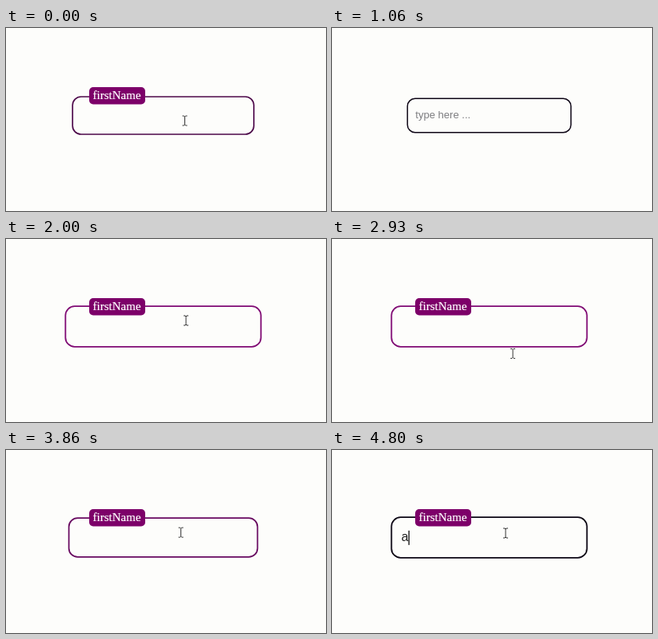
An HTML page that plays this animation: 400 px wide and 229 px high, repeating every 5 s.

```html
<!DOCTYPE html>
<html lang="en">
<head>
<meta charset="utf-8">
<title>Input label</title>
<style>
  html, body { margin: 0; width: 100%; height: 100%; overflow: hidden; background: #fdfdfb; }
  svg { display: block; width: 100%; height: 100%; }
  .sans { font: 13px "Liberation Sans", Arial, sans-serif; }
  .serif { font: 15px "Liberation Serif", "Times New Roman", serif; }
</style>
</head>
<body>
<svg viewBox="0 0 400 229">
  <g id="field">
    <rect id="border" x="94.7" y="88.4" width="203.6" height="42.2" rx="9.5" fill="none" stroke-width="1.5"/>
    <text id="placeholder" class="sans" x="104.7" y="113" fill="#7d7d80">type here ...</text>
    <text id="typed" class="sans" x="105" y="113.3" fill="#222">a</text>
    <rect id="caret" y="102.3" width="1.2" height="15" fill="#222"/>
  </g>
  <g id="label">
    <rect x="104" y="74" width="70" height="21.5" rx="5" fill="#7d0069"/>
    <text class="serif" x="108.6" y="89.3" fill="#fff" stroke="#fff" stroke-width=".2">firstName</text>
  </g>
  <path id="pointer" d="M-3-6h2l1 1 1-1h2M-3 6h2l1-1 1 1h2M0-5V5" fill="none" stroke="#333"/>
</svg>
<script>
const LOOP = 5000, STEP = 1000 / 15, TRANSITION = 300, TYPED_AT = 4400;
const PURPLE = [128, 10, 116], BLACK = [12, 6, 20];
const focusSpans = [[-98, 820], [1670, 3150], [3720, LOOP + TRANSITION]];
const caretSpans = [[60, 400], [2050, 2930], [4000, LOOP]];
// Each path lists [time, x, y]; the pointer is hidden between paths.
const pointerPaths = [
  [[0, 223.5, 116], [400, 223.5, 117.5], [530, 224, 137], [599, 224, 137]],
  [[1520, 228, 225], [1740, 225, 102], [2000, 225, 102], [2260, 226, 141], [2930, 226, 141], [3059, 228, 232]],
  [[3730, 220, 110], [3930, 218, 100], [4260, 218, 100], [4460, 217, 104], [5000, 217, 104]]
];

const el = id => document.getElementById(id);
const clamp = v => Math.max(0, Math.min(1, v));
const mix = (a, b, p) => a + (b - a) * p;
const within = (spans, t) => spans.some(([from, to]) => t >= from && t < to);
const show = (id, on) => el(id).setAttribute("visibility", on ? "visible" : "hidden");

// The CSS "ease" curve: cubic-bezier(.25, .1, .25, 1)
function ease(x) {
  if (x <= 0 || x >= 1) return clamp(x);
  const bezier = (a, b, u) => 3 * a * u * (1 - u) ** 2 + 3 * b * u * u * (1 - u) + u ** 3;
  let low = 0, high = 1;
  for (let i = 0; i < 20; i++) {
    const mid = (low + high) / 2;
    if (bezier(.25, .25, mid) < x) low = mid; else high = mid;
  }
  return bezier(.1, 1, low);
}

const progress = (t, start) => ease((t - start) / TRANSITION);

function pointerAt(t) {
  const path = pointerPaths.find(p => t >= p[0][0] && t <= p[p.length - 1][0]);
  if (!path) return null;
  const next = Math.max(1, path.findIndex(point => point[0] >= t));
  const [t0, x0, y0] = path[next - 1], [t1, x1, y1] = path[next];
  const p = (t - t0) / (t1 - t0);
  return [mix(x0, x1, p), mix(y0, y1, p)];
}

function draw(t) {
  const focused = within(focusSpans, t);
  const typed = t >= TYPED_AT;
  const growth = focusSpans.reduce((sum, [on, off]) => sum + progress(t, on) - progress(t, off), 0);
  const tint = growth * (1 - progress(t, TYPED_AT));

  el("field").setAttribute("transform", `translate(196.5 109.5) scale(${1 + .2 * growth}) translate(-196.5 -109.5)`);
  el("border").setAttribute("stroke", `rgb(${BLACK.map((c, i) => Math.round(mix(c, PURPLE[i], tint)))})`);
  el("caret").setAttribute("x", typed ? 112.3 : 105);
  show("placeholder", !focused);
  show("label", focused);
  show("typed", typed);
  show("caret", within(caretSpans, t));

  const pointer = pointerAt(t);
  show("pointer", pointer);
  if (pointer) el("pointer").setAttribute("transform", `translate(${pointer})`);
}

const start = performance.now();
function frame() {
  const t = (performance.now() - start) % LOOP;
  // Steps fall on times cut down to 10 ms, hence the small lead.
  draw(Math.min(Math.floor((t + 7) / STEP) * STEP, LOOP - STEP));
  requestAnimationFrame(frame);
}
frame();
</script>
</body>
</html>
```
